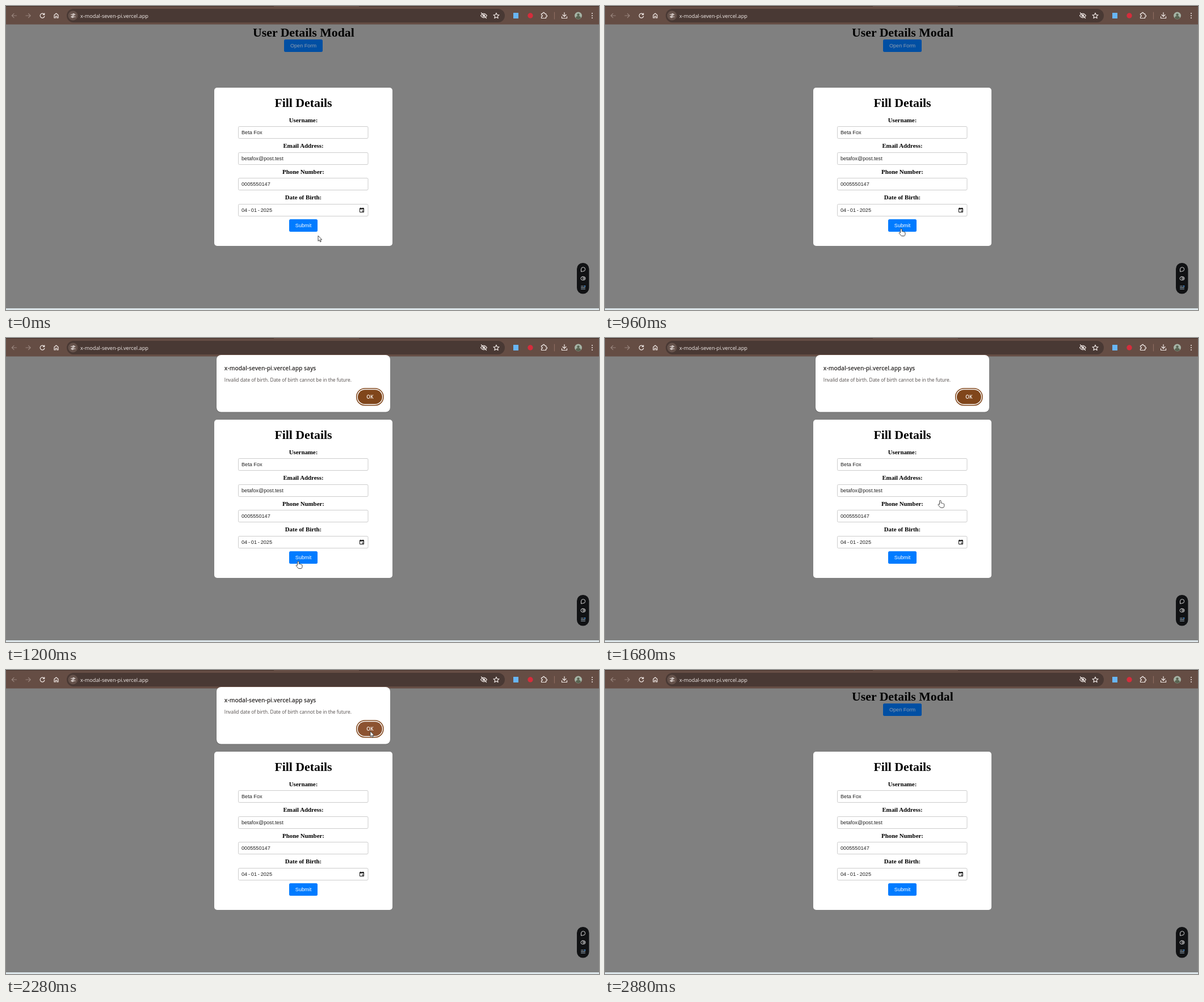
An HTML page for the animation above (3 s loop, 1045 by 536 pixels).

```html
<!DOCTYPE html>
<html lang="en">
<head>
<meta charset="utf-8">
<title>User Details Modal</title>
<style>
html, body { margin: 0; width: 100%; height: 100%; overflow: hidden; background: #808080; }
svg { display: block; width: 100%; height: 100%; }
.serif { font: bold 10.85px "Liberation Serif", "Times New Roman", serif; text-anchor: middle; }
.title { font-size: 21.8px; }
.sans { font: 9.15px "Liberation Sans", Arial, sans-serif; fill: #222; }
.button { fill: #fff; text-anchor: middle; }
.ui { font-family: "Open Sans", "Noto Sans", sans-serif; }
.icon { fill: none; stroke: #f1e9e6; stroke-width: 1.2; stroke-linecap: round; stroke-linejoin: round; }
.dim { stroke: #98847c; }
</style>
</head>
<body>
<svg viewBox="0 0 1045 536" preserveAspectRatio="none">
  <rect width="1045" height="536" fill="#808080"/>

  <!-- Page behind the modal -->
  <text class="serif title" x="524.4" y="53.5">User Details Modal</text>
  <rect x="490" y="59" width="68" height="22" rx="2.5" fill="#004fa3"/>
  <text class="sans button" x="524" y="73" style="fill:#8f9db0">Open Form</text>
  <rect y="533" width="1045" height="3" fill="#dce5e9"/>

  <!-- Browser toolbar -->
  <rect width="1045" height="32.5" fill="#654d44"/>
  <path d="M0 .5H472M622 .5H1045" stroke="#443029"/>
  <rect x="107" y="5" width="772" height="24" rx="12" fill="#493934"/>
  <circle cx="118" cy="17" r="8.5" fill="#65524b"/>
  <g class="icon">
    <path class="dim" d="M18.500 17H10.500M14 13.300L10.300 17L14 20.700M35 17H43M39.500 13.300L43.200 17L39.500 20.700"/>
    <path d="M67 14.500A3.900 3.900 0 1 0 67.900 18M67.800 12.800V15.300H65.200"/>
    <path d="M85 16V21H87.300V18H89.700V21H92V16L88.500 13Z"/>
    <path d="M114.500 15H117M121 15H122M114.500 19H115.500M119.500 19H122"/>
    <circle cx="119" cy="15" r="1.300"/><circle cx="117.300" cy="19" r="1.300"/>
    <path d="M836.500 17Q842 9.500 847.500 17Q842 24.500 836.500 17ZM837.500 12L846.500 21.500"/>
    <circle cx="842" cy="17" r="1.700"/>
    <path d="M864 12.200L865.400 15.500L869 15.800L866.300 18.100L867.100 21.600L864 19.700L860.900 21.600L861.700 18.100L859 15.800L862.600 15.500Z"/>
    <path d="M943.500 13.500H946Q945.700 11.300 947.500 11.300T949 13.500H951.500V16Q953.500 15.700 953.500 17.500T951.500 19V21.500H943.500V18.800Q945.500 18.500 945.500 17.300T943.500 16Z"/>
    <path d="M984 11.500V18M981 15.500L984 18.500L987 15.500M979.500 18.500V21.500H988.500V18.500"/>
    <path d="M966.500 11V23" stroke="#8e6c5f"/>
  </g>
  <rect x="894" y="12" width="9" height="10" fill="#68b5f5"/>
  <circle cx="924" cy="17" r="4.700" fill="#d52d3c"/>
  <circle cx="1008.500" cy="17" r="6.500" fill="#a5b3a5"/>
  <path d="M1004 21.500Q1004 17.500 1008.500 17.500T1013 21.500Q1008.500 25 1004 21.500Z" fill="#596451"/>
  <circle cx="1008.500" cy="15.500" r="2.200" fill="#596451"/>
  <g fill="#f1e9e6"><circle cx="1033" cy="13" r="1"/><circle cx="1033" cy="17" r="1"/><circle cx="1033" cy="21" r="1"/></g>
  <text class="ui" x="131" y="20.500" font-size="9.200" fill="#f5eeeb">x-modal-seven-pi.vercel.app</text>

  <!-- Form -->
  <rect x="367" y="144" width="314" height="279" rx="5" fill="#fff"/>
  <text class="serif title" x="524" y="178">Fill Details</text>
  <g id="fields"></g>
  <g stroke="#111" fill="none"><path d="M623.500 357V363.500H630.500V357Z"/><path d="M623 357.500H631" stroke-width="2"/><path d="M625 355.500V357M629 355.500V357"/></g>
  <path d="M627.500 360.500H629.500V362.500H627.500Z" fill="#111"/>
  <rect x="499" y="376" width="50" height="22" rx="2.500" fill="#007bff"/>
  <text class="sans button" x="524" y="390" style="fill:#fff">Submit</text>

  <!-- Floating tools -->
  <rect x="1006" y="453" width="21.500" height="54.500" rx="10.500" fill="#111214"/>
  <g class="icon" style="stroke:#d4d4d4;stroke-width:1">
    <path d="M1013.500 468V464A3.600 3.600 0 1 1 1017 467.800Z"/>
    <rect x="1013" y="477.300" width="8" height="6" rx="3"/><circle cx="1018" cy="480.300" r="1.500"/>
    <path d="M1013.500 494H1017.500M1013.500 496.500H1020.500M1013.500 499H1020.500" stroke="#9fb0be"/>
  </g>
  <circle cx="1020" cy="494" r="1.300" fill="#4a8fd0"/>

  <!-- Alert -->
  <g id="alert">
    <rect x="370.500" y="30.500" width="306.500" height="101" rx="8" fill="#000" opacity=".18"/>
    <rect x="371" y="30" width="306" height="100.500" rx="8" fill="#fff"/>
    <g class="ui">
      <text x="384.800" y="56.500" font-size="10.200" font-weight="600" fill="#2b2827">x-modal-seven-pi.vercel.app says</text>
      <text x="384.800" y="76.500" font-size="8.380" fill="#514b49">Invalid date of birth. Date of birth cannot be in the future.</text>
      <rect x="617.700" y="89" width="47.300" height="29.700" rx="14.800" fill="#fff" stroke="#80461b" stroke-width="1.500"/>
      <rect id="ok" x="619.900" y="91.200" width="43" height="25.300" rx="12.600"/>
      <text x="641.300" y="107" font-size="8.500" font-weight="600" fill="#fff" text-anchor="middle">OK</text>
    </g>
  </g>

  <!-- Pointer, tip at the origin -->
  <g id="pointer" fill="#fff" stroke="#333" stroke-width=".9" stroke-linejoin="round">
    <path id="arrow" d="M0 0V9.500L2.200 7.500L3.700 11L5.300 10.300L3.800 7H6.700Z"/>
    <path id="hand" d="M-1.300 7V1Q-1.300 -.3 0 -.3T1.300 1V4.500Q3 3.700 3.500 5Q5 4.300 5.500 5.700Q7 5.300 7 7V9Q7 11 5.500 12.500H.5L-3.700 7.700Q-3.800 5.800 -2.200 6.300Z"/>
  </g>
</svg>
<script>
const LOOP = 3000, STEP = 120;
const el = id => document.getElementById(id);

const rows = [
  ["Username:", "Beta Fox"],
  ["Email Address:", "betafox@post.test"],
  ["Phone Number:", "0005550147"],
  ["Date of Birth:", "04 - 01 - 2025"]
];
el("fields").innerHTML = rows.map(([label, value], i) => {
  const y = 45.5 * i;
  const spacing = i === 3 ? "-.7px" : "0";
  return `<text class="serif" x="524" y="${204.5 + y}">${label}</text>
    <rect x="409.500" y="${Math.round(212 + y) + .5}" width="228.500" height="21" rx="2" fill="#fff" stroke="#ccc"/>
    <text class="sans" x="415" y="${226.3 + y}" style="word-spacing:${spacing}">${value}</text>`;
}).join("");

// Pointer path: time, x, y
const path = [
  [0, 550, 405], [600, 522, 393], [1080, 522, 393], [1200, 515, 394],
  [2040, 640, 217], [2280, 642, 108], [2400, 641, 104], [2640, 515, 39], [2880, 435, -10], [3000, 435, -10]
];

function pointerAt(t) {
  const i = path.findIndex(p => p[0] > t);
  const [t0, x0, y0] = path[i - 1], [t1, x1, y1] = path[i];
  const k = (t - t0) / (t1 - t0), e = k * k * (3 - 2 * k);
  return [x0 + (x1 - x0) * e, y0 + (y1 - y0) * e];
}

function draw(now) {
  const t = Math.floor(now % LOOP / STEP) * STEP;
  const [x, y] = pointerAt(t);
  const isHand = t >= 360 && y > 131;
  el("pointer").setAttribute("transform", `translate(${x} ${y})`);
  el("hand").style.display = isHand ? "" : "none";
  el("arrow").style.display = isHand ? "none" : "";

  const entering = t === 1080;
  el("alert").style.display = t >= 1080 && t < 2880 ? "" : "none";
  el("alert").setAttribute("opacity", entering ? .27 : 1);
  el("alert").setAttribute("transform", entering ? "translate(-3.140 -7.300) scale(1.006)" : "");
  el("ok").setAttribute("fill", t >= 2280 ? "#8c5331" : "#80461b");
}

const start = performance.now();
function tick() {
  draw(performance.now() - start);
  requestAnimationFrame(tick);
}
tick();
</script>
</body>
</html>
```
